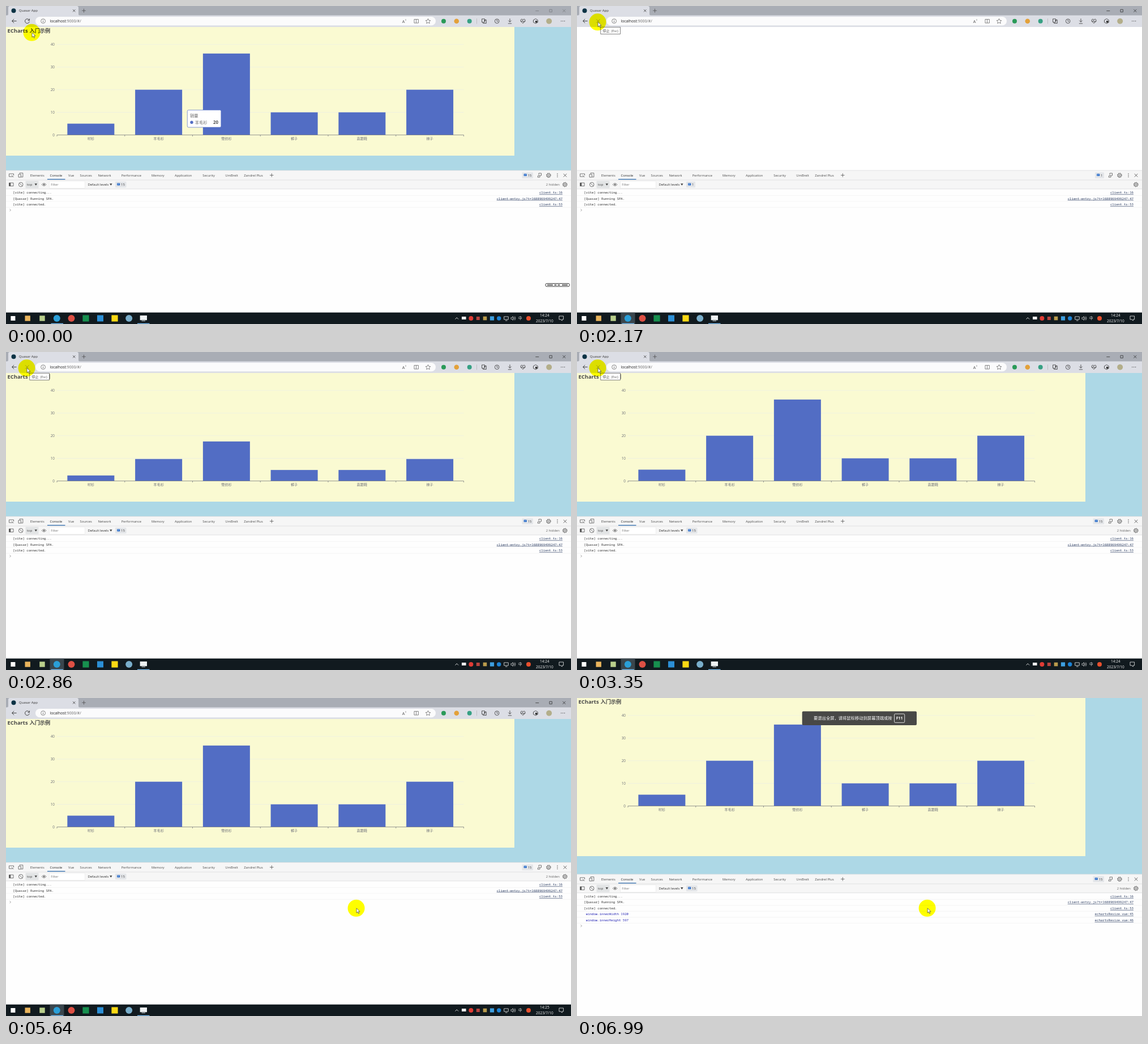
An HTML page that plays this animation: 998x561 px, repeating every 8 s.

```html
<!DOCTYPE html>
<html lang="zh">
<head>
<meta charset="utf-8">
<title>Chart reload</title>
<style>
  html, body { margin: 0; width: 100%; height: 100%; overflow: hidden; background: #fff; }
  svg { display: block; width: 100%; height: 100%; }
  text { font-family: "Open Sans", "Noto Sans CJK SC", sans-serif; white-space: pre; }
  .mono { font-family: "Noto Sans Mono", "DejaVu Sans Mono", monospace; }
  .link { text-decoration: underline; }
  #halo { mix-blend-mode: multiply; }
</style>
</head>
<body>
<svg id="stage" viewBox="0 0 998 561"></svg>
<script>
const LOOP = 8000;
const values = [5, 20, 36, 10, 10, 20];
const names = ['衬衫', '羊毛衫', '雪纺衫', '裤子', '高跟鞋', '袜子'];
const AXIS = 227.5, UNIT = 3.99, STEP = 119.75;

// Markup helpers; text is placed by its vertical centre.
const text = (x, y, s, size, fill = '#444', more = '') =>
  `<text x="${x}" y="${y + size * 0.36}" font-size="${size}" fill="${fill}" ${more}>${s}</text>`;
const rect = (x, y, w, h, fill, more = '') =>
  `<rect x="${x}" y="${y}" width="${w}" height="${h}" fill="${fill}" ${more}/>`;
const dot = (x, y, r, fill, more = '') => `<circle cx="${x}" cy="${y}" r="${r}" fill="${fill}" ${more}/>`;
const line = (d, stroke = '#3a3a3a', w = 0.8, more = '') =>
  `<path d="${d}" fill="none" stroke="${stroke}" stroke-width="${w}" ${more}/>`;
const ring = (x, y, r, stroke = '#444', w = 0.8) => dot(x, y, r, 'none', `stroke="${stroke}" stroke-width="${w}"`);
const group = (id, body) => `<g id="${id}">${body}</g>`;
const cross = (x, y, r, color, w) => line(`M${x - r} ${y - r}l${2 * r} ${2 * r}m0 ${-2 * r}l${-2 * r} ${2 * r}`, color, w);
const plus = (x, y, r) => line(`M${x - r} ${y}h${2 * r}M${x} ${y - r}v${2 * r}`, '#444', 0.7);
const END = 'text-anchor="end"', MID = 'text-anchor="middle"', BOLD = 'font-weight="700"';

function chart() {
  let s = rect(0, 37, 898, 600, '#fafad2', 'id="panel"');
  s += text(2.5, 43.5, 'ECharts', 9.4, '#464646', BOLD) + text(41.5, 43.5, '入门示例', 9.2, '#464646', BOLD);
  for (let v = 0; v <= 40; v += 10) {
    const y = AXIS - v * UNIT;
    if (v) s += line(`M90 ${y}H808.5`, '#e6ebe6', 0.6);
    s += text(86, y, v, 6.4, '#6e7079', END);
  }
  values.forEach((v, i) => {
    const x = 90 + STEP * (i + 0.5);
    s += rect(x - 41.5, AXIS, 83, 0, '#526dc4', 'class="bar"');
    s += text(x, 234, names[i], 6.24, '#6e7079', MID);
  });
  s += line(`M90 ${AXIS}H808.5`, '#6e7079', 0.7);
  for (let i = 0; i <= 6; i++) s += line(`M${90 + STEP * i} ${AXIS}v2.6`, '#6e7079', 0.7);
  return s;
}

function tip() {
  return rect(320.3, 183.6, 59.6, 30.4, '#fff', 'rx="2" stroke="#5470c6" stroke-width=".7"') +
    text(325, 193, '销量', 7.3, '#666') + dot(328, 205.3, 2.7, '#526dc4') +
    text(333.8, 205.3, '羊毛衫', 7.2, '#666') + text(375, 205.3, 20, 7.9, '#555', END + BOLD);
}

function browser() {
  let s = rect(0, 0, 998, 17, '#a9adb5') + rect(0, 16.5, 998, 20.5, '#dcdee5');
  s += '<path d="M1 17q3 0 3-3V3q0-3 3-3h118q3 0 3 3v11q0 3 3 3z" fill="#dcdee5"/>';
  s += dot(13.5, 8.3, 4, '#0b3345', 'id="favicon"') + line('M11 12a4 4 0 0 1 2-7.5', '#222', 1.2, 'id="spinner"');
  s += text(22.8, 8.3, 'Quasar App', 6, '#333') + cross(120.2, 8.3, 2.1, '#333', 0.8) + plus(137.5, 8.2, 3.4);
  s += group('controls', line('M935.3 8.6h6', '#222', 0.7) + line('M960 6.2h4.4v4.4h-4.4z', '#222', 0.7) +
    cross(985.8, 8.4, 2.5, '#222', 0.7));
  s += rect(52, 19, 707, 15.3, '#fbfbfc', 'rx="7.6"');
  s += line('M18.6 26.5H10.6M14.2 22.9L10.6 26.5l3.6 3.6', '#333', 0.9);
  s += group('reload', line('M41 25a3.9 3.9 0 1 0 .3 2.4M41.4 22.4v2.9h-2.9', '#333', 0.9));
  s += group('stop', cross(37.3, 26.5, 3.1, '#333', 0.9));
  s += ring(65.6, 26.6, 3.9, '#555', 0.7) + line('M65.6 26v2.8M65.6 24.4v.9', '#555', 0.8);
  s += text(77.5, 26.6, 'localhost<tspan fill="#666">:9000/#/</tspan>', 6.8, '#222');
  s += text(699.8, 27, 'A', 7.4, '#555') + text(705, 24.3, '))', 3.5, '#555');
  s += line('M721 23.5h3.6v6.5H721zM724.6 23.5h3.8V30h-3.8', '#555', 0.7);
  s += line('M745.5 22.4l1.3 2.8 3 .4-2.2 2.1.6 3-2.7-1.5-2.7 1.5.6-3-2.2-2.1 3-.4z', '#555', 0.7);
  s += dot(773, 26.7, 4, '#2a9a58') + dot(795.8, 26.7, 4.3, '#e3a13a') + dot(818.7, 26.7, 4, '#36a083', 'id="ext"');
  s += line('M831.5 22v9.5', '#aaa', 0.6);
  s += line('M840.6 22.8h5v5.8h-5zM842.6 28.8v1.7h5.7v-6h-2.5M844 25.7h3M845.5 24.2v3', '#333');
  s += ring(867.2, 26.7, 3.8, '#333') + line('M867.2 24.3v2.7h2', '#333');
  s += line('M890 22.2v6m-2.7-2.6l2.7 2.7 2.7-2.7M886.8 30.9h6.4', '#333');
  s += line('M913 30.5l-3.7-3.6q-1-3.2 1.6-3.8l2.1 1.2 2.2-1.2q2.8.7 1.6 3.8zM909 27.2h2.6l1-1.7 1.4 3 1-1.3h2.2', '#333');
  s += line('M931.5 24.8l4-2.3 3.8 2.3v4l-3.8 2-4-2z', '#333') + dot(936.7, 27.7, 2, '#333');
  s += dot(959.2, 26.8, 5, '#b3ae8a') + [980.8, 983.7, 986.6].map(x => dot(x, 26.6, 0.7, '#333')).join('');
  return s;
}

const badge = (x, y, id) => rect(x, y - 5.3, 19.5, 10.6, '#e4e6e9', `rx="1" id="${id}Box"`) +
  group(id, rect(x + 3.2, y - 2.6, 5, 4, '#2468c8', 'rx=".6"') +
  line(`M${x + 4.2} ${y - 1.2}h3M${x + 4.2} ${y}h2`, '#fff', 0.45)) +
  text(x + 10, y, 15, 6, '#444', `id="${id}Num"`);

function gear(x, y) {
  return ring(x, y, 3.1, '#555', 0.9) + ring(x, y, 1.2, '#555', 0.7) +
    dot(x, y, 4, 'none', 'stroke="#555" stroke-width=".9" stroke-dasharray="1.4 1.74"');
}

function devtools() {
  let s = rect(0, 290, 998, 300, '#fefefe') + rect(0, 290, 998, 33, '#f6f6f6');
  s += line('M0 290H998M0 307H998M0 322.8H998', '#d0d2d4', 0.6);
  s += line('M12 301H5.5v-5h8v3M10 298.5l3.5 3.5', '#555') + line('M24 296v-1.3h5.8v7H27M22 297h4.4v5H22z', '#555');
  const tabs = [[42.7, 'Elements'], [77.6, 'Console'], [110, 'Vue'], [130.6, 'Sources'], [162.5, 'Network'],
    [203.8, 'Performance'], [257, 'Memory'], [298, 'Application'], [347.3, 'Security'],
    [387.3, 'UmBrelt'], [420.3, 'Zandrel Plus']];
  for (const [x, label] of tabs) s += text(x, 298.7, label, 5.8, x === 77.6 ? '#222' : '#4a4a4a');
  s += rect(73, 305, 31.5, 1.3, '#3470b0') + plus(469.3, 298.5, 3.3);
  s += badge(911.5, 298.7, 'topBadge');
  s += line('M939 302l1-3h3v3zM941 297.5v-2.5h4.5v4h-2', '#555') + gear(958.4, 298.7);
  s += [296, 298.7, 301.4].map(y => dot(974, y, 0.7, '#444')).join('') + cross(987.5, 298.7, 2.8, '#444', 0.8);

  s += line('M5.5 312h7.5v5.6H5.5z', '#555') + rect(5.5, 312, 2.7, 5.6, '#555');
  s += ring(26.2, 315, 3.8, '#555') + line('M23.6 312.3l5.2 5.3', '#555');
  s += rect(34.5, 308.6, 23, 13, '#e2e4e5', 'rx="1"') + text(37, 315.2, 'top', 5.9);
  s += '<path d="M50.5 313.2h4.6l-2.3 3.6zM183 313.2h4.6l-2.3 3.6z" fill="#444"/>';
  s += line('M63.2 315q4-4.5 7.8 0q-3.8 4.5-7.8 0z', '#555', 0.7) + dot(67.1, 315, 1.3, '#555');
  s += rect(76.5, 309, 63, 12.4, '#fff', 'stroke="#e2e2e2" stroke-width=".5"') + text(79.3, 315.2, 'Filter', 5.7, '#777');
  s += text(144.5, 315.2, 'Default levels', 5.9, '#333') + badge(193, 315, 'lowBadge');
  s += text(978, 315.2, '2 hidden', 5.9, '#666', END + ' id="hidden"') + gear(987.3, 315);

  const log = [['[vite] connecting...', 'client.ts:16'], ['[Quasar] Running SPA.', 'client-entry.js?t=1688969499247:47'],
    ['[vite] connected.', 'client.ts:53'], [' window.innerWidth 1920', 'echartsResize.vue:45'],
    [' window.innerHeight 597', 'echartsResize.vue:46']];
  log.forEach(([msg, src], i) => {
    const y = 329 + 10.5 * i;
    s += '<g class="row">' + text(12.3, y, msg, 5.71, i > 2 ? '#2424b4' : '#303030', 'class="mono"') +
      text(983, y, src, 5.71, '#26385e', END + ' class="mono link"') +
      line(`M0 ${y + 5.3}H998`, '#ececec', 0.6) + '</g>';
  });
  return s + line('M6.5 326.8l2 1.8-2 1.8', '#777', 0.7, 'id="prompt"');
}

function taskbar() {
  let s = rect(0, 540.7, 998, 20.3, '#111a1f');
  s += rect(77.5, 540.7, 25, 20.3, '#3a464d', 'id="active"');
  s += rect(79.5, 559.7, 21.5, 1.3, '#76b9ed') + rect(232, 559.7, 21.5, 1.3, '#76b9ed');
  const box = (x, fill, r = 4.7) => rect(x - r, 551 - r, 2 * r, 2 * r, fill);
  s += box(12.4, '#fff', 4) + box(38.2, '#e9b45c') + box(64, '#b9cf8c') + dot(89.8, 551, 6, '#2a9fd8');
  s += dot(115.5, 551, 6, '#dd5044') + box(141, '#17904f', 5.6) + box(166.5, '#2c8fd6', 5.5) + box(192, '#fbd914', 5.6);
  s += dot(217.2, 551, 6, '#79aecb') + rect(236.7, 546, 12.3, 8.2, '#eef2f4') + rect(239.5, 555, 6.5, 1, '#cbd2d6');
  s += line('M793.5 552.5l2.8-2.8 2.8 2.8', '#eee', 0.9) + rect(805, 548, 7.6, 5, '#eee');
  s += dot(821.4, 551, 4, '#e03c35') + box(833.8, '#b8443f', 3) + box(846, '#b99b4c', 3.3) + box(858.5, '#3e9fe0', 3.6);
  s += dot(870.7, 551, 3.7, '#1c83d6');
  s += line('M879.7 548h7.6v5h-7.6zM882 555h3.5', '#eee') + line('M892 549.6h1.5l2-2v6.8l-2-2H892zM897 549q1.6 2 0 4M898.6 547.6q2.6 3.4 0 6.8', '#eee', 0.7);
  s += text(908.4, 551, '中', 6.6, '#eee', MID) + dot(923, 551, 4, '#e8502e');
  s += text(951.4, 546, '14:24', 6.5, '#f2f2f2', MID + ' id="clock"') + text(951.4, 555.6, '2023/7/10', 6.5, '#f2f2f2', MID);
  return s + line('M977 547h7.6v6h-2.4v2.2l-2.2-2.2h-3z', '#eee');
}

const recorder = () => rect(953, 489.5, 42.4, 5.3, '#fff', 'rx="2.3" stroke="#333" stroke-width="1"') +
  line('M956 492.2h10m2.5 0h4m2 0h4m3.5 0h10', '#333', 1.5);

const stopTip = () => rect(41.8, 37.3, 34.6, 12.2, '#fff', 'stroke="#666" stroke-width=".8"') +
  text(45.3, 43.5, '停止', 6.2, '#555') + text(60.6, 43.5, '(Esc)', 5.8, '#555');

const toast = () => rect(397.7, 23.4, 202.3, 24.6, '#484846', 'rx="2"') +
  text(418, 35.7, '要退出全屏，请将鼠标移动到屏幕顶端或按', 7.3, '#fff', 'font-weight="500"') +
  rect(560.5, 28, 18.2, 15.4, 'none', 'rx="1.8" stroke="#fff" stroke-width=".8"') +
  text(569.6, 35.8, 'F11', 6.8, '#fff', MID + BOLD);

const stage = document.getElementById('stage');
stage.innerHTML = rect(0, 0, 998, 561, '#add8e6') + group('chart', chart() + group('tip', tip())) +
  rect(0, 37, 998, 260, '#fff', 'id="blank"') + group('dev', devtools()) + group('browser', browser()) +
  group('taskbar', taskbar()) + group('recorder', recorder()) + group('stopTip', stopTip()) + group('toast', toast()) +
  group('pointer', dot(0, 0, 15, '#ff0', 'id="halo"') +
    '<path d="M.5 0v8.3l2-1.8 1.4 3.1 1.3-.6-1.4-3h2.7z" fill="#fff" stroke="#222" stroke-width=".6"/>');
// Blending must reach the page, so the halo sits outside the pointer group.
const pointer = document.getElementById('pointer');
const halo = document.getElementById('halo');
stage.insertBefore(halo, pointer);

const $ = id => document.getElementById(id);
const bars = [...document.querySelectorAll('.bar')];
const rows = [...document.querySelectorAll('.row')];
const set = (el, attr, v) => el.setAttribute(attr, v);
const show = (id, on) => set($(id), 'opacity', +on);
const clamp = p => Math.max(0, Math.min(1, p));
const cubic = p => p < 0.5 ? 4 * p ** 3 : 1 - 4 * (1 - p) ** 3;
const smooth = p => p * p * (3 - 2 * p);

const path = [[0, 45.5, 46.8], [70, 45.5, 46.8], [420, 36.5, 28.3], [3420, 36.5, 28.3],
  [3910, 141.2, 352], [4190, 618.6, 370.8], [LOOP, 618.6, 370.8]];
function cursorAt(t) {
  const i = Math.max(1, path.findIndex(k => k[0] >= t));
  const [a, b] = [path[i - 1], path[i]];
  const p = smooth(clamp((t - a[0]) / (b[0] - a[0])));
  return [a[1] + (b[1] - a[1]) * p, a[2] + (b[2] - a[2]) * p];
}

function render(t) {
  const base = t < 2300 ? 0 : 2300;
  const held = base + Math.floor((t - base) / 70) * 70;
  const full = t >= 5900;
  const loading = t >= 770 && t < 3420;
  const spinning = t >= 770 && t < 1820;

  const grow = t < 1540 ? 1 : cubic(clamp((held - 2365) / 1000));
  bars.forEach((bar, i) => {
    const h = values[i] * UNIT * grow;
    set(bar, 'y', AXIS - h);
    set(bar, 'height', h);
  });
  set($('chart'), 'transform', `translate(0 ${full ? -37 : 0})`);
  set($('panel'), 'height', full ? 279 : 227);
  set($('dev'), 'transform', `translate(0 ${full ? 20.9 : 0})`);
  show('blank', t >= 1540 && t < 2365);
  show('browser', !full);
  show('taskbar', !full);
  show('tip', clamp((350 - held) / 200));
  show('recorder', t < 350);
  set($('controls'), 'opacity', t < 700 ? 0.4 : 1);
  show('active', t >= 700);

  show('favicon', !spinning);
  show('spinner', spinning);
  set($('spinner'), 'transform', `rotate(${(held - 1260) * 0.4} 13.5 8.3)`);
  show('reload', !loading);
  set($('stop'), 'opacity', loading ? (t < 1750 ? 1 : 0.4) : 0);
  show('stopTip', t >= 1500 && t < 3480);
  set($('ext'), 'fill', t >= 840 && t < 1820 ? '#9a9da1' : '#36a083');

  const few = t >= 770 && t < 2440;
  for (const [id, shift] of [['topBadge', 3.5], ['lowBadge', 0]]) {
    $(id + 'Num').textContent = few ? 1 : 15;
    const move = few ? `translate(${shift} 0)` : '';
    for (const part of ['', 'Box', 'Num']) set($(id + part), 'transform', move);
    set($(id + 'Box'), 'width', few ? 16 : 19.5);
  }
  show('hidden', !few);
  const count = t < 770 ? 3 : t < 1050 ? 0 : t < 1190 ? 1 : t < 1960 ? 2 : t < 6040 ? 3 : 5;
  rows.forEach((row, i) => set(row, 'opacity', +(i < count)));
  set($('prompt'), 'transform', `translate(0 ${10.5 * count})`);

  $('clock').textContent = t < 4050 ? '14:24' : '14:25';
  show('toast', clamp((held - 6080) / 320));
  const move = `translate(${cursorAt(held)})`;
  set(pointer, 'transform', move);
  set(halo, 'transform', move);
}

const start = performance.now();
function frame() {
  render((performance.now() - start) % LOOP);
  requestAnimationFrame(frame);
}
frame();
</script>
</body>
</html>
```
